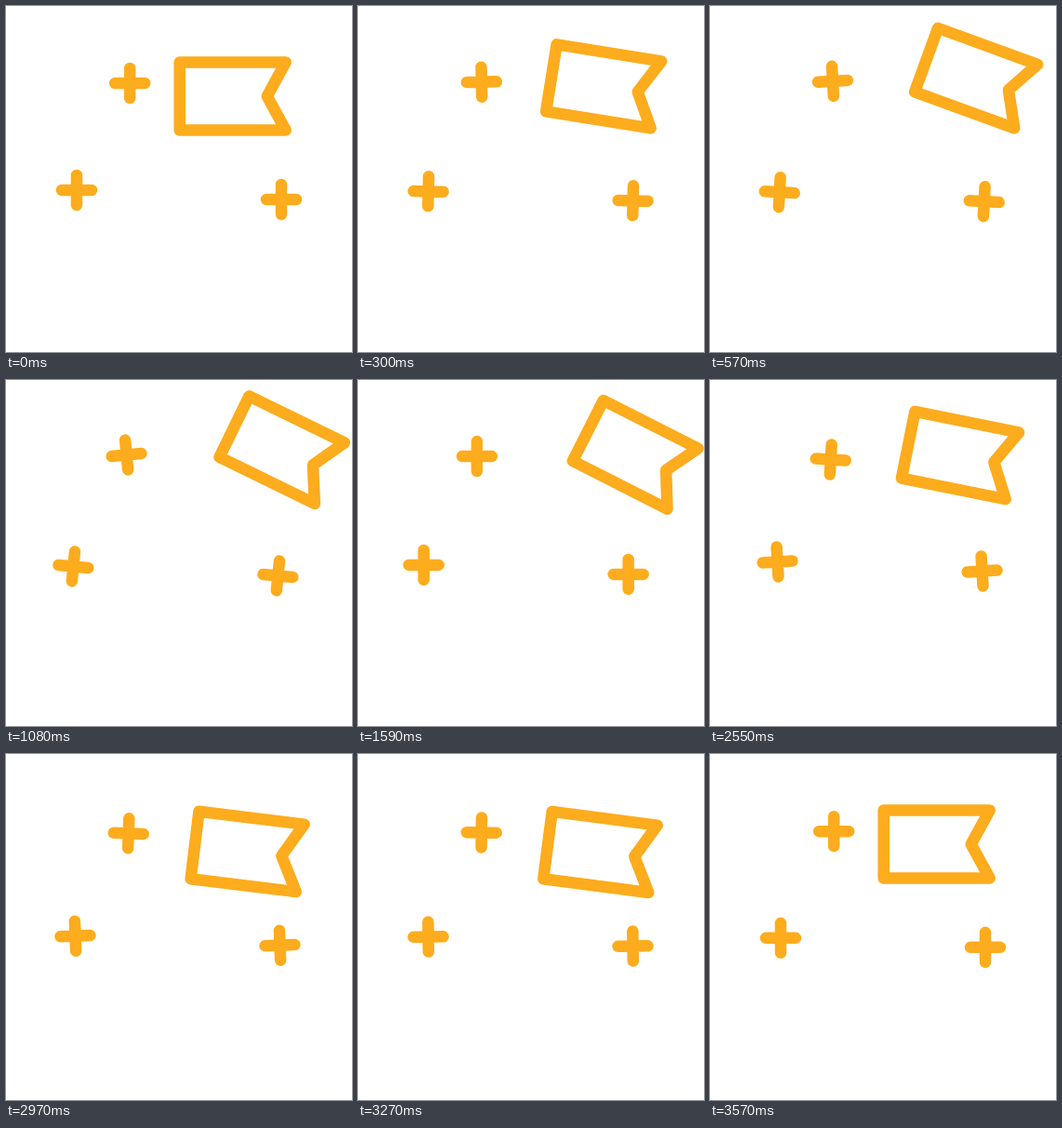
Animation, 372 px wide and 372 px high, one loop 3600 ms. Source, as an HTML page:

```html
<!DOCTYPE html>
<html lang="en">
<head>
<meta charset="utf-8">
<title>Waving flag</title>
<style>
  html, body { margin: 0; height: 100%; overflow: hidden; background: #fff; }
  svg { display: block; width: 100%; height: 100%; }
  path { fill: none; stroke: #fdac1d; stroke-width: 12.5; stroke-linecap: round; stroke-linejoin: round; }
</style>
</head>
<body>
<svg viewBox="0 0 372 372">
  <path id="flag" stroke-width="13" d="M0-170.5H114L94-134L114-97.5H0Z"/>
  <path class="plus" d="M-16 0H16M0-16V16"/>
  <path class="plus" d="M-16 0H16M0-16V16"/>
  <path class="plus" d="M-16 0H16M0-16V16"/>
</svg>
<script>
const LOOP = 3600;

// Smooth curve through [time, value] keys, at rest at peaks and at both ends.
function curve(keys) {
  const secant = i => (keys[i + 1][1] - keys[i][1]) / (keys[i + 1][0] - keys[i][0]);
  const slopes = keys.map((_, i) => {
    if (i === 0 || i === keys.length - 1) return 0;
    const before = secant(i - 1), after = secant(i);
    return before * after > 0 ? (before + after) / 2 : 0;
  });
  return t => {
    let i = 0;
    while (i < keys.length - 2 && t >= keys[i + 1][0]) i++;
    const [t0, a] = keys[i], [t1, b] = keys[i + 1];
    const d = t1 - t0, u = (t - t0) / d, v = 1 - u;
    return v * v * ((1 + 2 * u) * a + u * d * slopes[i])
         + u * u * ((1 + 2 * v) * b - v * d * slopes[i + 1]);
  };
}

const lean = curve([[0, 0], [570, 20], [1080, 26], [1590, 26.9], [1850, 27], [2160, 25.4],
  [2550, 11.4], [2700, 9.6], [2970, 7], [3200, 8.2], [3570, 0], [LOOP, 0]]);
const jump = curve([[0, 0], [570, -47], [1030, -60.5], [1590, -57], [2160, -57],
  [2550, -30], [2700, -5.4], [2740, 0], [LOOP, 0]]);
const tilt = curve([[0, 0], [570, 3.2], [1050, 5.6], [1590, 0], [2150, -3.6],
  [2550, -3.4], [2970, -2.1], [3570, 0], [LOOP, 0]]);

const flag = document.getElementById("flag");
const pluses = document.querySelectorAll(".plus");
const spots = [[133.2, 83, -1], [76, 198, 1], [296, 208, 1]];

function place(node, x, y, angle) {
  node.setAttribute("transform", `translate(${x} ${y}) rotate(${angle})`);
}

function draw(now) {
  const t = now % LOOP;
  const phase = t / LOOP * 2 * Math.PI;
  place(flag, 186.7, 231 + jump(t), lean(t));
  spots.forEach(([x, y, side], i) => place(pluses[i],
    x - 2.75 * (1 - Math.cos(phase)),
    y + side * 2.6 * Math.sin(phase),
    side * tilt(t)));
  requestAnimationFrame(() => draw(performance.now()));
}
draw(performance.now());
</script>
</body>
</html>
```
